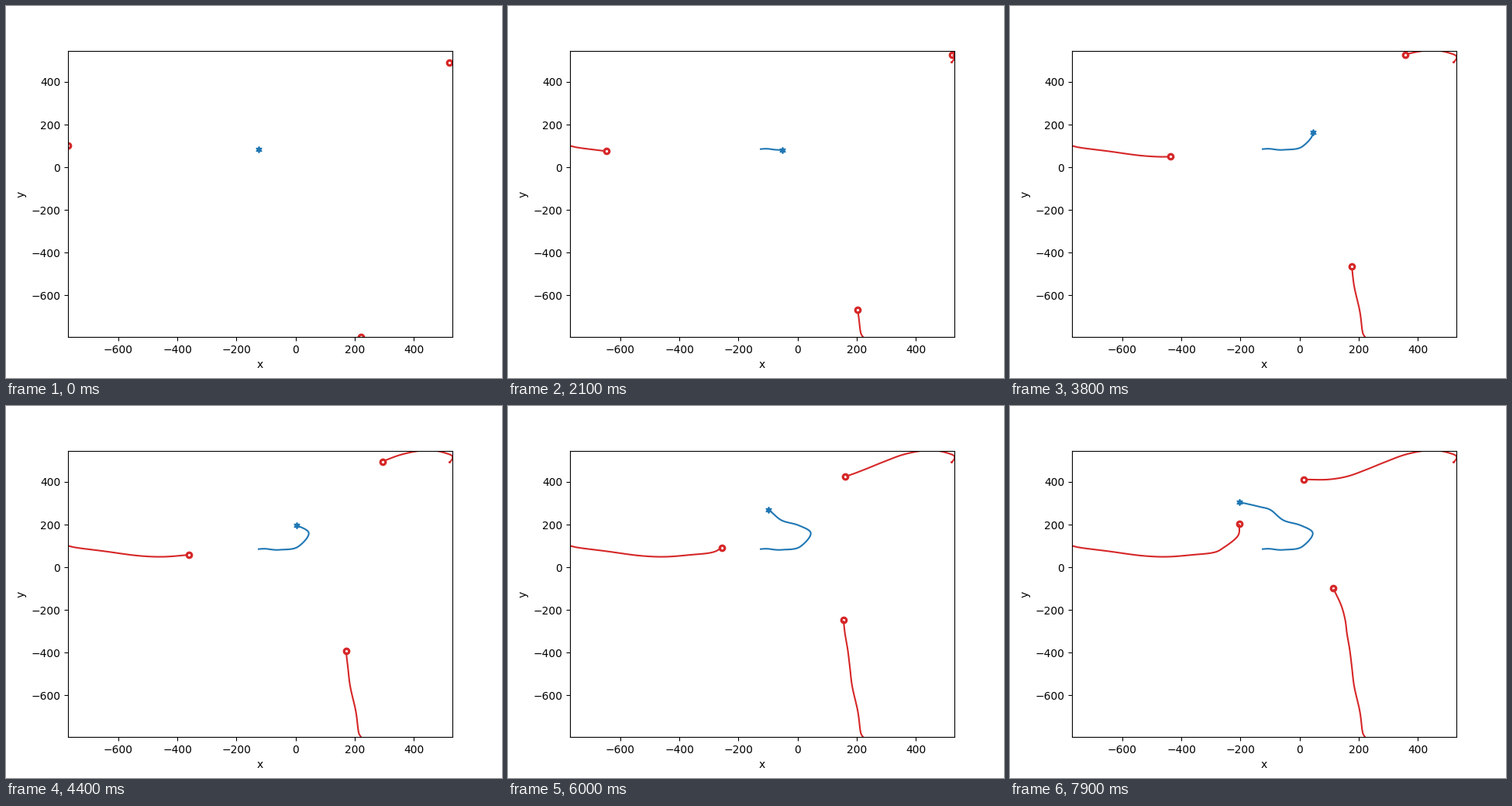
Write a matplotlib script that moves like this. It is 640 px wide and 480 px high and loops after 8000 ms.

```python
import numpy as np
import matplotlib.pyplot as plt
from matplotlib.animation import FuncAnimation

STEPS = 80
WIDTH, HEIGHT = 640, 480

# Each agent passes its key points, in stage pixels, at these steps
KEY_STEPS = np.array([0, 9, 21, 30, 38, 44, 51, 60, 68, 79])
EVADER = [(326, 184.6), (334, 184.2), (354, 185.5), (377, 181.5), (390.5, 163),
          (375, 154), (354, 148), (336, 134), (322, 130), (296, 124)]
WEST = [(80, 180.4), (91, 182.8), (127, 187.4), (173, 193.4), (207, 194.4),
        (236, 192), (261, 189.4), (276, 182.5), (293, 169), (296, 151.8)]
NORTH = [(572, 72.6), (573, 72.5), (573, 62.7), (544, 57), (510, 62.7),
         (486, 71.5), (460, 82), (434.5, 91), (412, 94.7), (379, 94.8)]
SOUTH = [(458, 427), (455, 421), (451, 392), (444, 361), (441, 336),
         (438.5, 315.5), (435, 295), (432.5, 276), (428, 259), (417, 235)]

fig, ax = plt.subplots(figsize=(WIDTH / 100, HEIGHT / 100), dpi=100)
ax.set_xlim(-770, 530)
ax.set_ylim(-795.5, 546.5)
ax.set_xlabel("x")
ax.set_ylabel("y")


def smooth_path(points):
    """Cubic Hermite curve through the key points, one position per step."""
    p = np.array(points, float)
    slope = np.gradient(p, KEY_STEPS, axis=0)
    steps = np.arange(STEPS)
    i = np.searchsorted(KEY_STEPS[1:-1], steps, side="right")
    h = np.diff(KEY_STEPS)[i, None]
    s = (steps - KEY_STEPS[i])[:, None] / h
    x, y = ((1 + 2 * s) * (1 - s) ** 2 * p[i]
            + s * (1 - s) ** 2 * h * slope[i]
            + s * s * (3 - 2 * s) * p[i + 1]
            + s * s * (s - 1) * h * slope[i + 1]).T
    return ax.transData.inverted().transform(np.column_stack([x, HEIGHT - y]))


class Agent:
    def __init__(self, points, color, **style):
        self.path = smooth_path(points)
        self.trail, = ax.plot([], [], color=color, lw=1.5)
        self.head, = ax.plot([], [], color=color, ls="", **style)

    def move(self, step):
        # The trail stays one step behind the head
        self.trail.set_data(*self.path[:step].T)
        self.head.set_data(*self.path[step:step + 1].T)
        return self.trail, self.head


RING = dict(marker="o", ms=4.7, mew=2.3, mfc="none")
agents = [Agent(p, "C3", **RING) for p in (WEST, NORTH, SOUTH)]
agents.append(Agent(EVADER, "C0", marker=(6, 1, 0), ms=6, mew=1))


def update(step):
    return [artist for agent in agents for artist in agent.move(step)]


anim = FuncAnimation(fig, update, frames=STEPS, interval=100,
                     repeat=True, repeat_delay=0)
plt.show()
```
